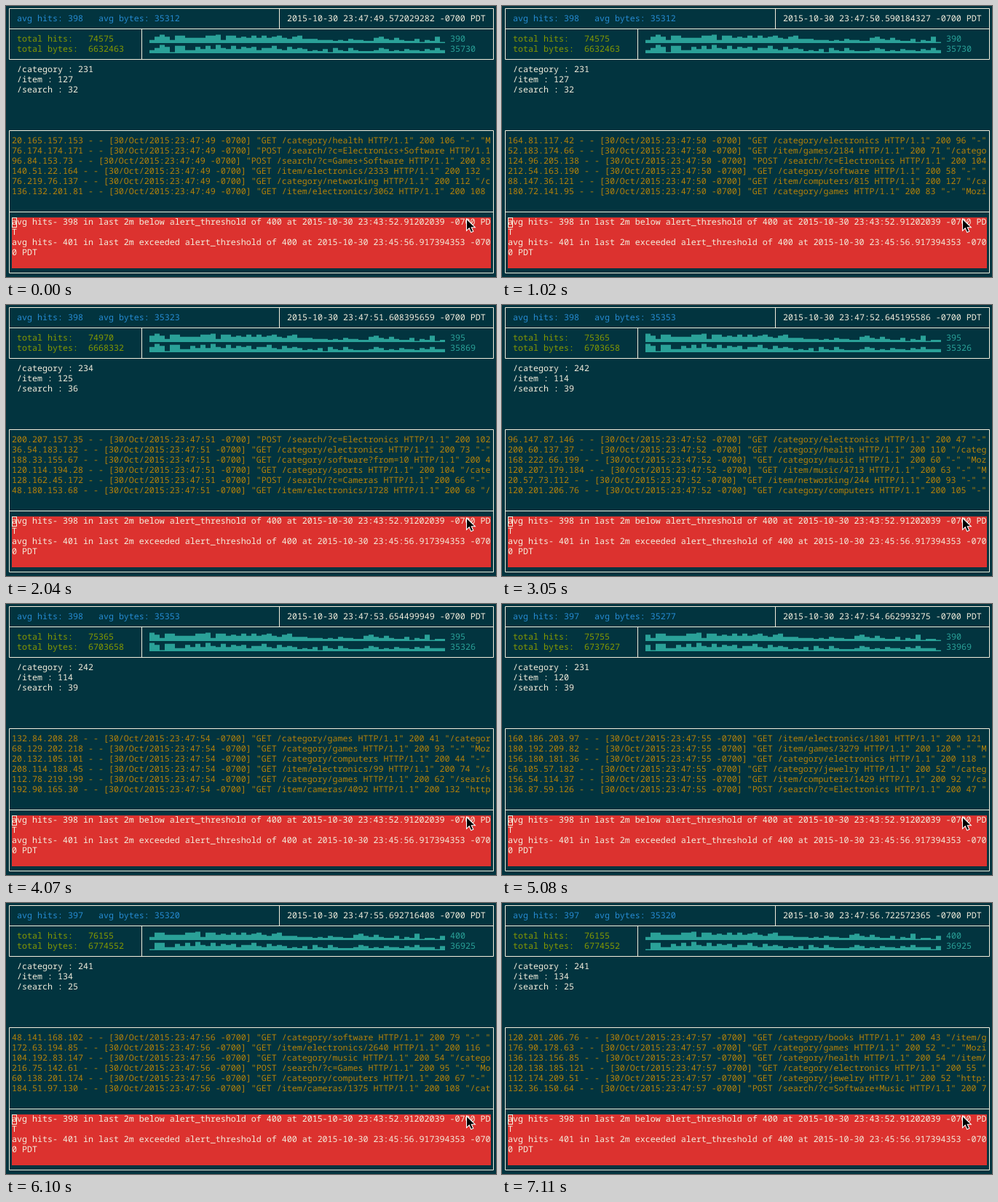
Write an HTML page that moves like this. It is 673 px wide and 373 px high and loops after 8000 ms.

```html
<!DOCTYPE html>
<html lang="en">
<head>
<meta charset="utf-8">
<title>Log monitor</title>
<style>
  html, body { margin: 0; width: 100%; height: 100%; overflow: hidden; background: #02343f; }
  svg { display: block; width: 100vw; height: 100vh; }
  text {
    font: 500 11.667px "Noto Sans Mono", "DejaVu Sans Mono", monospace;
    white-space: pre;
    text-rendering: geometricPrecision;
  }
</style>
</head>
<body>
<svg id="stage" viewBox="0 0 673 373"></svg>
<script>
const NS = 'http://www.w3.org/2000/svg';
const stage = document.getElementById('stage');
const LOOP = 8000, CELL = 7, LINE = 14, COLS = 94, BARS = 58;
const WHITE = '#f3eedd', BLUE = '#268bd2', GREEN = '#859900',
      CYAN = '#2aa198', AMBER = '#b58209', RED = '#dc322f';

const colX = c => 1 + CELL * c;
const rowY = r => 3.5 + LINE * r;

function add(tag, attrs) {
  const el = document.createElementNS(NS, tag);
  for (const k in attrs) el.setAttribute(k, attrs[k]);
  return stage.appendChild(el);
}

function label(col, row, fill, str = '') {
  const el = add('text', { x: colX(col), y: rowY(row) + 3.6, fill });
  el.textContent = str;
  return el;
}

// Values shown by the counters after each update.
const stats = [
  { avg: [398, 35312], total: [74575, 6632463], last: [390, 35730], pages: [231, 127, 32] },
  { avg: [398, 35323], total: [74970, 6668332], last: [395, 35869], pages: [234, 125, 36] },
  { avg: [398, 35353], total: [75365, 6703658], last: [395, 35326], pages: [242, 114, 39] },
  { avg: [397, 35277], total: [75755, 6737627], last: [390, 33969], pages: [231, 120, 39] },
  { avg: [397, 35320], total: [76155, 6774552], last: [400, 36925], pages: [241, 134, 25] }
];

// Bar heights in eighths; the visible window moves one step per update.
const history = [
  '36863775555778377565757567546744433323243322564353224132612214',
  '35861773364748547465635574364542324153253222354232433243533314'
];

// Each log line: address | request | status size and trailing fields.
const ticks = [
  { at: 0, clock: '49.572029282', sec: 49, stat: 0, log: `
20.165.157.153|GET /category/health|106 "-" "Mozilla
76.174.174.171|POST /search/?c=Electronics+Software|118
96.84.153.73|POST /search/?c=Games+Software|83 "-"
140.51.22.164|GET /item/electronics/2333|132 "-"
76.219.76.137|GET /category/networking|112 "/category
136.132.201.81|GET /item/electronics/3062|108 "-"` },
  { at: 1020, clock: '50.590184327', sec: 50, stat: 0, log: `
164.81.117.42|GET /category/electronics|96 "-" "Mozilla
52.183.174.66|GET /item/games/2184|71 "/category
124.96.205.138|POST /search/?c=Electronics|104 "-"
212.54.163.190|GET /category/software|58 "-" "Mozilla
88.147.36.121|GET /item/computers/815|127 "/category
180.72.141.95|GET /category/games|83 "-" "Mozilla` },
  { at: 2040, clock: '51.608395659', sec: 51, stat: 1, log: `
200.207.157.35|POST /search/?c=Electronics|102 "-"
36.54.183.132|GET /category/electronics|73 "-" "Mozilla
188.33.155.67|GET /category/software?from=10|48 "-"
120.114.194.28|GET /category/sports|104 "/category
128.162.45.172|POST /search/?c=Cameras|66 "-" "Mozilla
48.180.153.68|GET /item/electronics/1728|68 "/category` },
  { at: 3050, clock: '52.645195586', sec: 52, stat: 2, log: `
96.147.87.146|GET /category/electronics|47 "-" "Mozilla
200.60.137.37|GET /category/health|110 "/category
168.222.66.199|GET /category/music|60 "-" "Mozilla
120.207.179.184|GET /item/music/4713|63 "-" "Mozilla
20.57.73.112|GET /item/networking/244|93 "-" "Mozilla
120.201.206.76|GET /category/computers|105 "-" "Mozilla` },
  { at: 4070, clock: '53.654499949', sec: 54, stat: 2, log: `
132.84.208.28|GET /category/games|41 "/category
68.129.202.218|GET /category/games|93 "-" "Mozilla
20.132.105.101|GET /category/computers|44 "-" "Mozilla
208.114.188.45|GET /item/electronics/99|74 "/search
112.78.219.199|GET /category/games|62 "/search
192.90.165.30|GET /item/cameras/4092|132 "http:` },
  { at: 5080, clock: '54.662993275', sec: 55, stat: 3, log: `
160.186.203.97|GET /item/electronics/1801|121 "-"
180.192.209.82|GET /item/games/3279|120 "-" "Mozilla
156.180.181.36|GET /category/electronics|118 "-"
56.105.57.182|GET /category/jewelry|52 "/category
156.54.114.37|GET /item/computers/1429|92 "/category
136.87.59.126|POST /search/?c=Electronics|47 "-"` },
  { at: 6100, clock: '55.692716408', sec: 56, stat: 4, log: `
48.141.168.102|GET /category/software|79 "-" "Mozilla
172.63.194.85|GET /item/electronics/2640|116 "-"
104.192.83.147|GET /category/music|54 "/category
216.75.142.61|POST /search/?c=Games|95 "-" "Mozilla
60.138.201.174|GET /category/computers|67 "-" "Mozilla
184.51.97.130|GET /item/cameras/1375|108 "/category` },
  { at: 7110, clock: '56.722572365', sec: 57, stat: 4, log: `
120.201.206.76|GET /category/books|43 "/item/games
176.90.178.63|GET /category/games|52 "-" "Mozilla
136.123.156.85|GET /category/health|54 "/item/
120.138.185.121|GET /category/electronics|55 "-"
112.174.209.51|GET /category/jewelry|52 "http:
132.36.150.64|POST /search/?c=Software+Music|74 "-"` }
];

function logLines({ log, sec }) {
  return log.trim().split('\n').map(line => {
    const [ip, request, rest] = line.split('|');
    return `${ip} - - [30/Oct/2015:23:47:${sec} -0700] "${request} HTTP/1.1" 200 ${rest}`.slice(0, COLS);
  });
}

// Panel borders
add('path', {
  d: 'M4.5 3.5H669.5V73.5H4.5ZM4.5 31.5H669.5M375.5 3.5V31.5M186.5 31.5V73.5' +
     'M4.5 171.5H669.5V367.5H4.5ZM4.5 283.5H669.5',
  fill: 'none', stroke: WHITE, 'stroke-width': 1
});

// Header and counters
const avg = label(2, 1, BLUE);
const clock = label(55, 1, WHITE);
const totals = [label(2, 3, GREEN), label(2, 4, GREEN)];
const latest = [label(87, 3, CYAN), label(87, 4, CYAN)];
const graphs = [0, 1].map(() => add('path', { fill: CYAN }));
const pages = [6, 7, 8].map(r => label(2, r, WHITE));
const logRows = [13, 14, 15, 16, 17, 18].map(r => label(1, r, AMBER));

// Alerts
add('rect', { x: 8, y: 291, width: 658, height: 70, fill: RED });
[
  'avg hits- 398 in last 2m below alert_threshold of 400 at 2015-10-30 23:43:52.91202039 -0700 PD',
  'T',
  'avg hits- 401 in last 2m exceeded alert_threshold of 400 at 2015-10-30 23:45:56.917394353 -070',
  '0 PDT'
].forEach((str, i) => label(1, 21 + i, WHITE, str));
add('rect', { x: 8.5, y: 291.5, width: 6, height: 13, fill: 'none', stroke: WHITE });

// Mouse pointer
add('path', {
  d: 'M632.5 293V309.3L636.2 305.8L638.8 311.6L641.8 310.3L639.3 304.7H644.3Z',
  fill: '#000', stroke: '#fff', 'stroke-width': 1.1
});

function barPath(levels, row) {
  const base = rowY(row) + 5.5;
  return [...levels].map((n, i) => {
    const h = n * 1.45;
    return `M${colX(28 + i)} ${base}v${-h}h${CELL}v${h}z`;
  }).join('');
}

let shown = -1;

function draw(time) {
  const i = ticks.findLastIndex(t => t.at <= time);
  if (i === shown) return;
  shown = i;
  const tick = ticks[i], s = stats[tick.stat];
  clock.textContent = `2015-10-30 23:47:${tick.clock} -0700 PDT`;
  avg.textContent = `avg hits: ${s.avg[0]}   avg bytes: ${s.avg[1]}`;
  ['total hits:   ', 'total bytes:  '].forEach((name, k) => {
    totals[k].textContent = name + s.total[k];
    latest[k].textContent = s.last[k];
    graphs[k].setAttribute('d', barPath(history[k].slice(tick.stat, tick.stat + BARS), 3 + k));
  });
  ['category', 'item', 'search'].forEach((name, k) => {
    pages[k].textContent = `/${name} : ${s.pages[k]}`;
  });
  logLines(tick).forEach((line, k) => { logRows[k].textContent = line; });
}

const start = performance.now();
function loop() {
  draw((performance.now() - start) % LOOP);
  requestAnimationFrame(loop);
}
loop();
</script>
</body>
</html>
```
